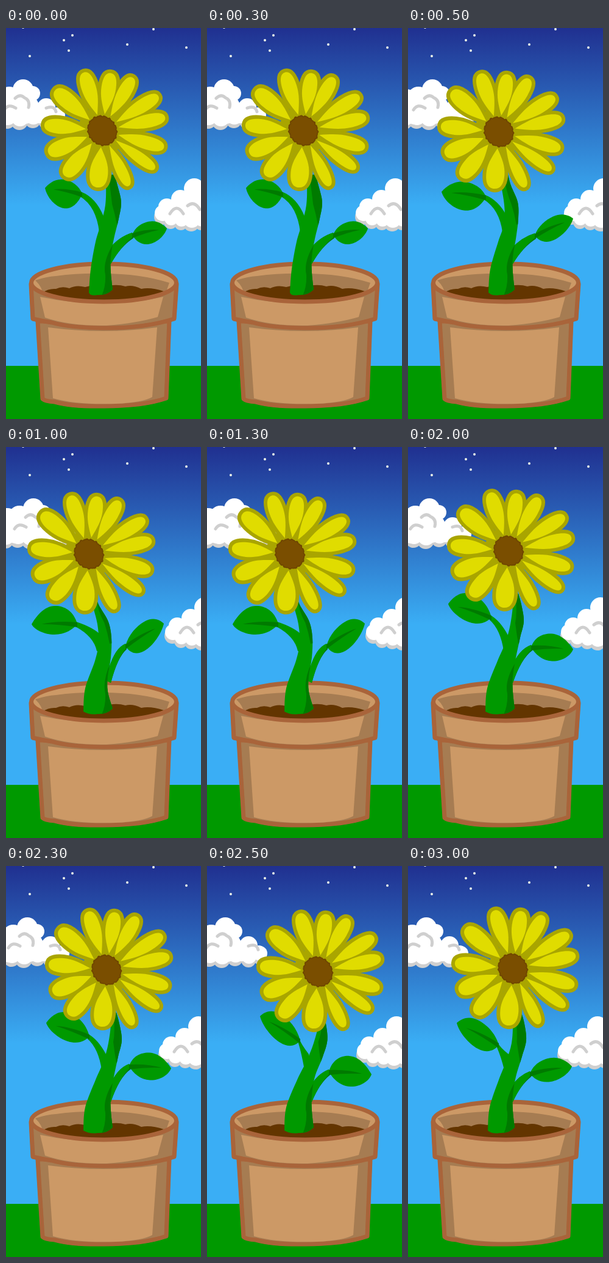
Animation of 320x640 px, one loop 3.5 s. Source, as an HTML page with a canvas:

```html
<!DOCTYPE html>
<html lang="en">
<head>
<meta charset="utf-8">
<title>Swaying flower</title>
<style>
html, body { margin: 0; width: 100%; height: 100%; overflow: hidden; background: #3aaef5; }
canvas { display: block; }
</style>
</head>
<body>
<canvas id="stage" width="320" height="640"></canvas>
<script>
const ctx = document.getElementById('stage').getContext('2d');
const STEP = 500;
const GREEN = '#009900', DARK = '#007a00', GRAY = '#cfcfcf';
const CLAY = '#cc9966', SHADE = '#a67c52', EDGE = '#a9643a';
const YELLOW = '#e0dc00', OLIVE = '#a9a500';

// head: centre; left: stem left edge, bottom to top; right: stem right edge, middle and top;
// leafA: base, tip, upper bulge; leafB: base, tip, upper and lower bulge.
const poses = [
  { cloud: 0, head: [158, 168], left: [136, 147, 156, 163, 164], right: [185, 183],
    leafA: [125, 272, 64, 262, 19], leafB: [207, 339, 264, 328, 17, 20] },
  { cloud: 12, head: [149, 170], left: [132, 148, 158, 158, 153], right: [181, 169],
    leafA: [128, 277, 55, 268, 21], leafB: [208, 340, 271, 312, 18, 21] },
  { cloud: 17, head: [136, 175], left: [127, 146, 152, 150, 142], right: [173, 152],
    leafA: [117, 290, 42, 290, 30], leafB: [196, 326, 259, 289, 22, 26] },
  { cloud: 12, head: [148, 170], left: [128, 145, 156, 159, 156], right: [182, 168],
    leafA: [126, 281, 40, 262, 26], leafB: [200, 326, 270, 308, 20, 25] },
  { cloud: 7, head: [165, 170], left: [127, 147, 160, 168, 172], right: [184, 186],
    leafA: [137, 279, 66, 257, 28], leafB: [202, 328, 271, 331, 24, 21] },
  { cloud: 2, head: [182, 173], left: [127, 148, 163, 175, 183], right: [190, 195],
    leafA: [153, 286, 87, 246, 24], leafB: [200, 337, 270, 341, 28, 22] },
  { cloud: 2, head: [172, 168], left: [131, 149, 161, 170, 172], right: [187, 191],
    leafA: [149, 293, 80, 257, 23], leafB: [200, 340, 269, 328, 20, 19] }
];

// Petals: tip offset from the head centre, then half width.
const petals = [
  [-32, -101, 12], [15, -100, 12], [53, -92, 11], [97, -60, 11], [109, -23, 11],
  [107, 29, 11], [91, 66, 9], [46, 96, 9], [-8, 99, 15], [-65, 79, 13],
  [-94, 39, 13], [-101, -10, 12], [-82, -70, 13]
];

function paint(path, fill, stroke, width) {
  const p = typeof path === 'string' ? new Path2D(path) : path;
  if (fill) { ctx.fillStyle = fill; ctx.fill(p); }
  if (stroke) {
    ctx.strokeStyle = stroke;
    ctx.lineWidth = width;
    ctx.lineJoin = ctx.lineCap = 'round';
    ctx.stroke(p);
  }
}

function circle(x, y, r, color) {
  ctx.fillStyle = color;
  ctx.beginPath();
  ctx.arc(x, y, r, 0, 7);
  ctx.fill();
}

// Smooth line through points, starting at the first one.
function curve(path, points) {
  points.forEach(([x, y], i) => {
    if (!i) return path.lineTo(x, y);
    const a = points[Math.max(i - 2, 0)], b = points[i - 1];
    const d = points[Math.min(i + 1, points.length - 1)];
    path.bezierCurveTo(b[0] + (x - a[0]) / 6, b[1] + (y - a[1]) / 6,
      x - (d[0] - b[0]) / 6, y - (d[1] - b[1]) / 6, x, y);
  });
  return path;
}

function sky() {
  const g = ctx.createLinearGradient(0, 0, 0, 290);
  g.addColorStop(0, '#203090');
  g.addColorStop(1, '#3aaef5');
  ctx.fillStyle = g;
  ctx.fillRect(0, 0, 320, 640);
  for (const [x, y] of [[28, -1], [109, 12], [95, 20], [103, 37], [39, 46], [199, 27], [242, 2], [296, 32]])
    circle(x, y, 2, '#eef5ea');
  ctx.fillStyle = '#009900';
  ctx.fillRect(0, 553, 320, 87);
}

function cloud(dx, tops, lows, folds) {
  ctx.save();
  ctx.translate(dx, 0);
  for (const [x, y, r] of lows) circle(x, y, r, GRAY);
  for (const [x, y, r] of lows) circle(x + 1, y - 6, r, '#fff');
  for (const [x, y, r] of tops) circle(x, y, r, '#fff');
  paint(folds, null, GRAY, 5);
  ctx.restore();
}

function clouds(dx) {
  cloud(dx,
    [[28, 101, 17], [44, 107, 12], [66, 130, 15], [83, 142, 12], [5, 114, 18], [-15, 118, 18], [30, 132, 25], [0, 135, 23], [55, 142, 14]],
    [[-18, 152, 14], [2, 152, 13], [22, 153, 14], [44, 151, 13], [66, 154, 12], [84, 149, 12]],
    'M-3 134Q4 123 16 131M15 115Q23 107 30 114Q40 118 37 130M66 131Q79 126 82 137');
  cloud(dx,
    [[309, 263, 17], [286, 280, 15], [264, 293, 14], [257, 302, 12], [289, 301, 20], [315, 294, 24]],
    [[256, 309, 13], [270, 318, 11], [287, 320, 11], [304, 320, 13], [321, 318, 13]],
    'M269 304Q280 286 291 304M298 291Q309 282 318 297');
}

function pot() {
  const body = 'M52 480L60 607Q64 611 80 612Q110 620 160 619Q225 619 263 606L268 480Z';
  paint(body, SHADE, EDGE, 7);
  paint('M69 490Q160 502 248 490L240 604Q225 613 180 615Q115 617 77 606Z', CLAY);
  paint(body, null, EDGE, 6);

  const rim = 'M41 419L44 476Q60 480 75 482Q105 491 165 491Q230 491 276 476L280 419Z';
  paint(rim, SHADE, EDGE, 7);
  paint('M56 440Q160 462 258 440L249 473Q215 483 165 487Q105 488 64 474Z', CLAY);
  paint(rim, null, EDGE, 6);

  const mouth = new Path2D();
  mouth.ellipse(160.5, 417, 119, 31, 0, 0, 7);
  ctx.save();
  ctx.clip(mouth);
  ctx.fillStyle = CLAY;
  ctx.fillRect(30, 380, 260, 75);
  paint('M48 413Q66 407 82 406Q120 401 160 402Q220 402 268 417L260 440L62 440Q60 424 48 413Z', SHADE);
  paint('M60 433Q70 426 82 427Q92 422 104 426Q115 420 130 424Q145 419 160 424Q180 418 196 423Q208 420 222 427Q238 424 259 431L240 455H80Z', '#633500');
  ctx.restore();
  paint(mouth, null, EDGE, 7);
}

function leaf(bx, by, tx, ty, up, down) {
  const dx = tx - bx, dy = ty - by;
  const at = (t, h) => `${bx + dx * t} ${by + dy * t + h} `;
  paint('M' + at(0, 0) +
    'C' + at(0.08, -up * 0.75) + at(0.3, -up) + at(0.48, -up) +
    'C' + at(0.74, -up) + at(0.92, -up * 0.35) + at(1, 0) +
    'C' + at(0.94, down * 0.55) + at(0.72, down) + at(0.5, down) +
    'C' + at(0.26, down) + at(0.1, down * 0.5) + at(0, 0), GREEN);
  paint('M' + at(0, -3) + 'Q' + at(0.45, -6) + at(0.78, 0) +
    'Q' + at(0.4, 0) + at(0, 5) + 'Z', DARK);
}

function plant({ left, right, leafA, leafB }) {
  const [base, , mid, , top] = left;
  const [edge, tip] = right;
  const [ax, ay] = leafA, [bx, by] = leafB;
  const branch = y => `M172 386Q${(170 + bx) / 2} ${by + 18} ${bx + 2} ${by + y}` +
    `L${bx} ${by - 4}Q${(162 + bx) / 2} ${by + 3} 169 362L160 380Z`;
  paint(branch(5), DARK);
  paint(branch(2), GREEN);
  paint(`M${ax - 2} ${ay - 4}Q${mid - 9} ${ay + 5} ${mid + 4} 308L${mid + 4} 335L${mid - 3} 334` +
    `Q${mid - 8} ${ay + 20} ${ax - 3} ${ay + 4}Z`, GREEN);

  const knee = base === 127 && edge < 180 ? 167 : 172;
  const stem = new Path2D();
  stem.moveTo(base, 433);
  curve(stem, [[base, 433], [base + 3, 395], [left[1], 350], [mid, 320], [left[3], 290], [top, 258], [top - 3, 240]]);
  curve(stem, [[tip - 5, 240], [tip, 258], [(edge + tip) / 2 + 5, 285], [edge, 312], [knee + 5, 345], [knee, 375], [knee, 400], [175, 428]]);
  stem.quadraticCurveTo(165, 438, 150, 437);
  stem.quadraticCurveTo(138, 439, base, 433);
  paint(stem, GREEN);

  ctx.save();
  ctx.clip(stem);
  paint(`M${top + 3} 235Q${top + 8} 268 ${(left[3] + edge) / 2} 288Q${edge - 6} 305 ${edge - 3} 322L205 315V235Z`, DARK);
  paint(`M${knee + 5} 352Q158 382 163 404Q164 424 156 440H185V352Z`, DARK);
  ctx.restore();

  leaf(...leafA, 47 - leafA[4]);
  leaf(...leafB);
}

function petalPath([x, y, w]) {
  const start = 27, end = Math.hypot(x, y) - 6, len = end - start;
  const at = (t, h) => `${start + len * t} ${h * w} `;
  const side = s => 'C' + at(0.25, 0.6 * s) + at(0.42, s) + at(0.65, s) +
    'C' + at(0.9, s) + at(1, 0.6 * s) + at(1, 0);
  return new Path2D('M' + at(0, 0) + side(1) + 'M' + at(0, 0) + side(-1));
}

function head([x, y]) {
  ctx.save();
  ctx.translate(x, y);
  circle(0, 0, 40, OLIVE);
  const each = draw => petals.forEach(p => {
    ctx.save();
    ctx.rotate(Math.atan2(p[1], p[0]));
    draw(petalPath(p));
    ctx.restore();
  });
  each(p => paint(p, OLIVE, OLIVE, 12));
  each(p => paint(p, YELLOW));

  const core = new Path2D();
  for (let i = 0; i < 90; i++) {
    const a = i * Math.PI / 45;
    const r = 23.5 + 1.2 * Math.cos(2 * a - 1.7) + 0.7 * Math.sin(17 * a) + 0.5 * Math.sin(29 * a);
    core.lineTo(r * Math.cos(a), r * Math.sin(a));
  }
  core.closePath();
  paint(core, '#7a4e00', '#704700', 2);
  ctx.restore();
}

function render(time) {
  const pose = poses[Math.floor(time / STEP) % poses.length];
  sky();
  clouds(pose.cloud);
  pot();
  plant(pose);
  head(pose.head);
  requestAnimationFrame(render);
}
render(0);
</script>
</body>
</html>
```
